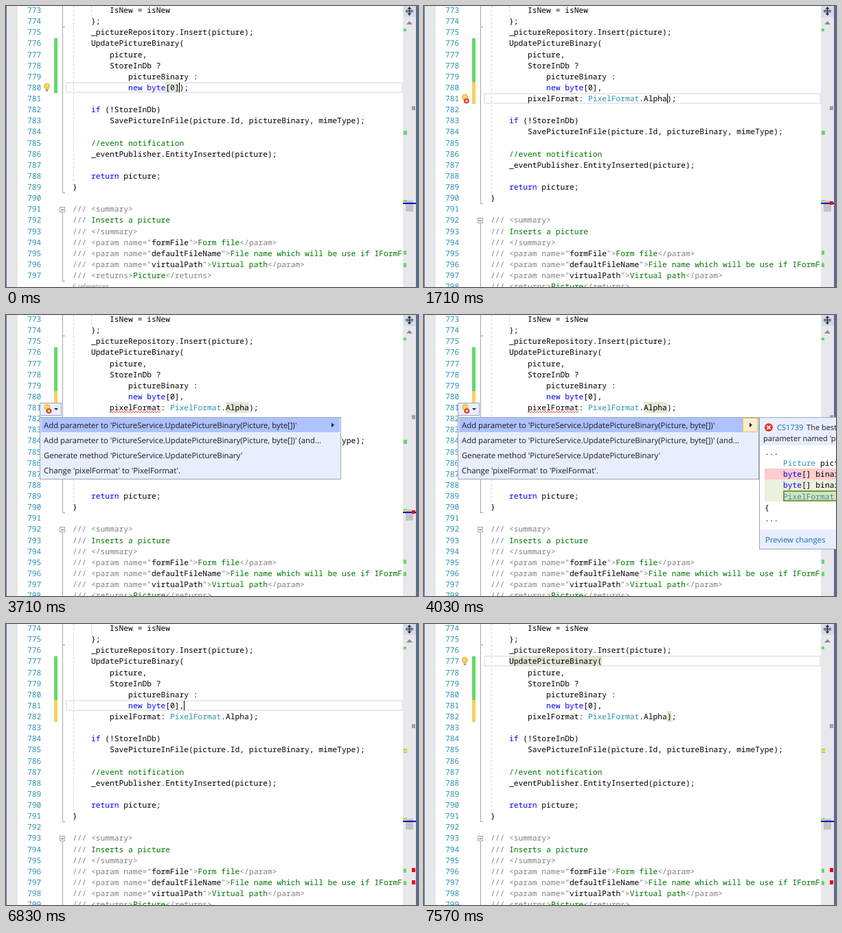
Recreate the animation shown at these times as an HTML page with a canvas. Size 600x410 px, loop 8000 ms.

```html
<!DOCTYPE html>
<html lang="en">
<head>
<meta charset="utf-8">
<title>Code editor: add parameter</title>
<style>
html, body { margin: 0; width: 100%; height: 100%; overflow: hidden; background: #fff; }
canvas { display: block; width: 600px; height: 410px; }
</style>
</head>
<body>
<canvas id="stage" width="600" height="410"></canvas>
<script>
const ctx = document.getElementById('stage').getContext('2d');
const LOOP = 8000, LEFT = 97, CHAR = 6.76, ROW = 16.13;
const MONO = '11.27px "Noto Sans Mono", "DejaVu Sans Mono", monospace';
const UI = size => `${size}px "Open Sans", "Noto Sans", sans-serif`;
const BLUE = '#0000ff', TEAL = '#2b91af', GRAY = '#808080', GREEN = '#007400';
const PANEL = '#e9eefe', EDGE = '#9ba7b7', SAVED = '#62d96b', UNSAVED = '#f4d35e', RED = '#f00000';
const BRACKET = '#dfe4d0', REFERENCE = '#e4e6d6';

const before = [
  '        IsNew = isNew',
  '    };',
  '    _pictureRepository.Insert(picture);',
  '    UpdatePictureBinary(',
  '        picture,',
  '        StoreInDb ?',
  '            pictureBinary :',
  '            new byte[0]);',
  '',
  '    if (!StoreInDb)',
  '        SavePictureInFile(picture.Id, pictureBinary, mimeType);',
  '',
  '    //event notification',
  '    _eventPublisher.EntityInserted(picture);',
  '',
  '    return picture;',
  '}',
  '',
  '/// <summary>',
  '/// Inserts a picture',
  '/// </summary>',
  '/// <param name="formFile">Form file</param>',
  '/// <param name="defaultFileName">File name which will be use if IFormFile is empty</param>',
  '/// <param name="virtualPath">Virtual path</param>',
  '/// <returns>Picture</returns>'
];
const after = [...before.slice(0, 7), '            new byte[0],',
  '        pixelFormat: PixelFormat.Alpha);', ...before.slice(8)];

// time, row, column, visible
const carets = [
  [0, 7, 23, 1], [70, 7, 23, 0], [530, 8, 38, 1], [1080, 8, 38, 0], [1620, 8, 38, 1],
  [2170, 8, 38, 0], [2700, 8, 38, 1], [3250, 8, 38, 0], [5730, 8, 38, 1], [6350, 8, 38, 0],
  [6830, 7, 24, 1], [6900, 6, 27, 1], [6970, 5, 19, 1], [7040, 4, 17, 1], [7110, 3, 24, 1],
  [7260, 3, 23, 1], [7570, 3, 23, 0]
];

const rowY = row => Math.round(row * ROW - 2);
const colX = col => LEFT + col * CHAR;

function rect(color, x, y, w, h) {
  ctx.fillStyle = color;
  ctx.fillRect(x, y, w, h);
}

function border(color, x, y, w, h) {
  ctx.strokeStyle = color;
  ctx.lineWidth = 1;
  ctx.strokeRect(x + .5, y + .5, w - 1, h - 1);
}

function shape(color, ...points) {
  ctx.fillStyle = color;
  ctx.beginPath();
  points.forEach(([x, y]) => ctx.lineTo(x, y));
  ctx.fill();
}

function line(color, width, ...points) {
  ctx.strokeStyle = color;
  ctx.lineWidth = width;
  ctx.beginPath();
  points.forEach(([x, y]) => ctx.lineTo(x, y));
  ctx.stroke();
}

function disc(color, x, y, r) {
  ctx.fillStyle = color;
  ctx.beginPath();
  ctx.arc(x, y, r, 0, 7);
  ctx.fill();
}

function text(str, x, y, color = '#000', font = MONO) {
  ctx.font = font;
  ctx.fillStyle = color;
  ctx.fillText(str, x, y);
}

function tokens(str) {
  if (str.startsWith('///')) {
    return str.split(/(^\/\/\/|<[^">]*"?|"?>)/).map((part, i, all) =>
      [part, i % 2 ? GRAY : /"$/.test(all[i - 1]) ? '#000' : GREEN]);
  }
  return str.split(/(\/\/.*|\b(?:if|new|byte|return)\b|\b(?:PixelFormat|Picture)\b)/).map((part, i) =>
    [part, i % 2 === 0 ? '#000' : part[0] === '/' ? GREEN : /^P/.test(part) ? TEAL : BLUE]);
}

function code(str, x, y, colored = true) {
  if (!colored) return text(str, x, y);
  let col = 0;
  for (const [part, color] of tokens(str)) {
    if (part.trim()) text(part, x + col * CHAR, y, color);
    col += part.length;
  }
}

function errorIcon(x, y, r) {
  const d = r * .42;
  disc('#e5321e', x, y, r);
  line('#fff', r * .32, [x - d, y - d], [x + d, y + d]);
  line('#fff', r * .32, [x - d, y + d], [x + d, y - d]);
}

function bulb(x, y, failed) {
  disc('#f2b93b', x, y - 1.5, 4.5);
  disc('#ffd766', x, y - 1.5, 3);
  rect('#f2b93b', x - 2, y + 1, 4, 2);
  rect('#777', x - 2, y + 3.5, 4, 1);
  rect('#777', x - 1.5, y + 5, 3, 1);
  if (failed) errorIcon(x + 2.5, y + 4, 3.8);
}

function highlight(color, row, col, count) {
  rect(color, colX(col), rowY(row), count * CHAR, 16);
}

function drawGutter(shift) {
  rect('#e6e7e8', 0, 0, 17, 410);
  rect('#5d6b99', 0, 0, 1, 410);

  const outline = '#a5a5a5', end = 272 + shift, box = 293 + shift;
  rect(outline, 82, 0, 1, end);
  rect(outline, 82, 30, 4, 1);
  rect(outline, 82, end, 4, 1);
  rect(outline, 82, box + 8, 1, 100);
  rect(outline, 82, 401 + shift, 4, 1);
  border(outline, 78, box, 8, 8);
  rect('#555', 80, box + 4, 4, 1);

  ctx.setLineDash([3, 3]);
  line('#d4d4d4', 1, [98.5, 0], [98.5, 258 + shift]);
  line('#d4d4d4', 1, [124.5, 0], [124.5, 14]);
  ctx.setLineDash([]);
}

function drawScrollbar(t, edited, applied) {
  rect('#e8e8ec', 578, 0, 19, 410);
  rect('#5d6b99', 597, 0, 3, 410);
  rect('#d6dbe9', 579, 0, 18, 16);
  rect('#1b293e', 582, 6, 11, 1);
  rect('#1b293e', 582, 8, 11, 1);
  rect('#1b293e', 587, 2, 1, 11);
  shape('#1b293e', [587.5, 1], [590.5, 4.5], [584.5, 4.5]);
  shape('#1b293e', [587.5, 14], [590.5, 10.5], [584.5, 10.5]);
  shape('#868999', [587.5, 22], [592, 27], [583, 27]);

  rect('#c2c3c9', 582, 284, 11, 16);
  rect(SAVED, 579, 33, 4, 4);
  rect(SAVED, 579, 182, 5, 6);
  if (applied) rect('#e8dc4c', 579, 183, 5, 4);
  rect(SAVED, 579, 283, 5, 3);
  if (edited) rect('#e8dc4c', 580, 284, 4, 3);
  rect(SAVED, 579, 357, 4, 6);
  rect(SAVED, 579, 375, 4, 6);
  rect('#a0a0a4', 591, 146, 5, 6);
  rect('#0000cd', 578, 287, 19, 2);
  if (t >= 1710 && t < 6580) rect(RED, 591, 285, 5, 5);
  if (t >= 6580) {
    rect(RED, 591, 356, 5, 6);
    rect(RED, 591, 374, 5, 6);
  }
}

function drawMenu(t) {
  rect(PANEL, 49, 128, 32, 19);
  border(EDGE, 49, 128, 32, 19);
  bulb(60, 136, true);
  shape('#1b293e', [70, 136], [76, 136], [73, 139]);

  rect(PANEL, 49, 149, 439, 91);
  border(EDGE, 49, 149, 439, 91);
  rect('#aec2fd', 51, 150, 435, 21);
  if (t >= 3880) {
    rect('#fbeecf', 464, 150, 22, 21);
    border('#e5c365', 464, 150, 22, 21);
  }
  shape('#1b293e', [474, 157], [478, 160.5], [474, 164]);
  const method = "'PictureService.UpdatePictureBinary";
  [`Add parameter to ${method}(Picture, byte[])'`,
    `Add parameter to ${method}(Picture, byte[])' (and...`,
    `Generate method ${method}'`,
    "Change 'pixelFormat' to 'PixelFormat'."
  ].forEach((item, i) => text(item, 55, Math.round(164.5 + i * 22.2), '#1b1b1b', UI(11.37)));
}

function drawPreview(colored) {
  rect(PANEL, 488, 149, 112, 193);
  errorIcon(502, 164, 6);
  text('CS1739', 514, 168, '#0e70c0', UI(11.1));
  text("The best overload for 'UpdatePictureBinary'", 557, 168, '#1b1b1b', UI(11.1));
  text("parameter named 'pixelFormat'", 494, 184, '#1b1b1b', UI(11.1));
  rect('#fff', 489, 190, 111, 123);
  rect('#ffcccc', 496, 224, 104, 16);
  rect('#ebf1dd', 496, 240, 104, 32);
  rect('#d7e3bc', 523, 256, 80, 16);
  ctx.strokeStyle = '#7a9a3a';
  ctx.lineWidth = 2;
  ctx.strokeRect(524, 257, 90, 14);
  ['...', '    Picture picture,', '    byte[] binary)', '    byte[] binary,',
    '    PixelFormat pixelFormat)', '{', '...'
  ].forEach((str, i) => code(str, 496, Math.round(204 + i * 16.15), colored));
  text('Preview changes', 497, 332, '#0e70c0', UI(11.37));
  border(EDGE, 488, 149, 120, 193);
}

function draw(t) {
  const edited = t >= 530, applied = t >= 5730;
  const menuOpen = t >= 3710 && t < 5730;
  const lines = edited ? after : before;
  const firstNumber = applied ? 774 : 773;
  const [, row, col, visible] = carets.filter(([time]) => time <= t).pop();

  rect('#fff', 0, 0, 600, 410);
  drawGutter(edited ? 16 : 0);
  rect(SAVED, 70, 47, 5, edited ? 64 : 80);
  if (edited) rect(UNSAVED, 70, 111, 5, 32);

  if (!menuOpen) {
    ctx.strokeStyle = '#e9e9f0';
    ctx.lineWidth = 2;
    ctx.strokeRect(88, rowY(row) + 1, 489, 14);
  }
  if (t < 760) {
    highlight(BRACKET, 7, 20, 1);
    highlight(BRACKET, 7, 22, 1);
  }
  if (t >= 2790 && t < 5730) highlight(REFERENCE, 8, 33, 5);
  if (t >= 7570) {
    highlight(REFERENCE, 3, 4, 19);
    highlight(BRACKET, 3, 23, 1);
    highlight(BRACKET, 8, 38, 1);
  }

  lines.forEach((str, i) => {
    const y = rowY(i) + 12;
    text(firstNumber + i, 31, y, TEAL);
    code(str, LEFT, y, !(i === 8 && t < 1310));
  });
  if (!edited) text('6 references', LEFT, 412, '#8a8a8a', UI(9.2));

  if (t >= 3250 && t < 6510) {
    const wave = Array.from({ length: 38 }, (_, i) => [151 + i * 2, i % 2 ? 140.5 : 142.5]);
    line('#ff2020', 1, ...wave);
  }
  if (visible) rect('#000', Math.round(colX(col)), rowY(row) + 1, 1, 14);

  if (t < 530) bulb(59.5, 118.5);
  else if (t >= 1480 && t < 3710) bulb(59.5, 134.5, true);
  else if (t >= 6200 && t < 6830) bulb(59.5, 134.5);
  else if (t >= 7570) bulb(59.5, 54);

  drawScrollbar(t, edited, applied);
  if (menuOpen) drawMenu(t);
  if (menuOpen && t >= 3880) drawPreview(t >= 4030);
}

ctx.textRendering = 'geometricPrecision';
const start = performance.now();
function tick() {
  draw((performance.now() - start) % LOOP);
  requestAnimationFrame(tick);
}
tick();
</script>
</body>
</html>
```
